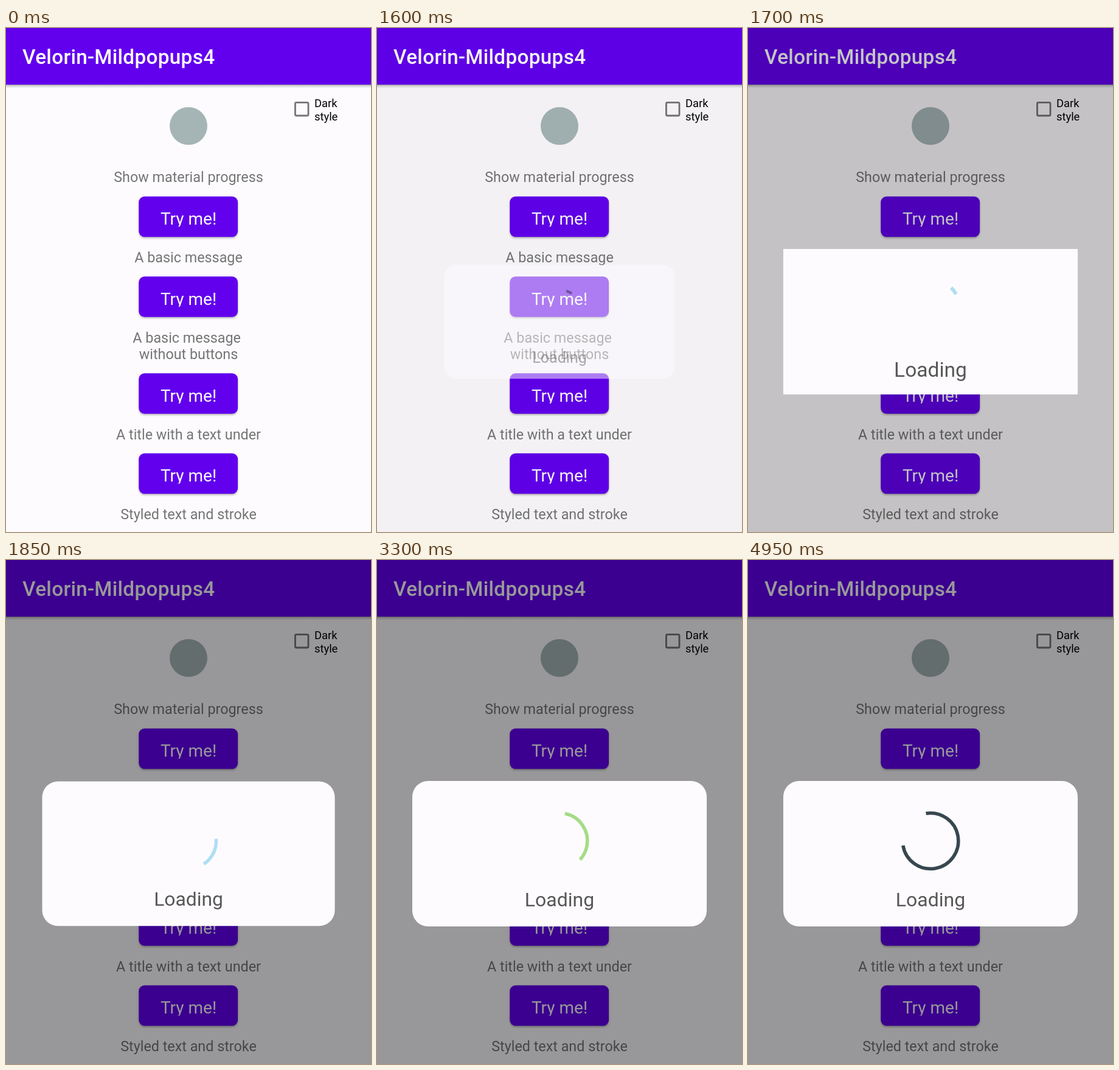
Write an HTML page with a canvas that moves like this. It is 600x828 px and loops after 5 s.

```html
<!DOCTYPE html>
<html lang="en">
<head>
<meta charset="utf-8">
<title>Dialog demo</title>
<style>
html, body { margin: 0; width: 100%; height: 100%; overflow: hidden; background: #fdfbfe; }
canvas { display: block; width: 600px; height: 828px; }
</style>
</head>
<body>
<canvas id="stage" width="600" height="828"></canvas>
<script>
const ctx = document.getElementById('stage').getContext('2d');
const W = 600, H = 828, LOOP = 5000, STEP = 50;
const SURFACE = '#fdfbfe', PURPLE = '#6200ee';
const DIALOG = { x: 58, y: 363, w: 484, h: 239, radius: 26, start: 1556 };
const SPINNER = { x: 300, y: 461.5, radius: 45.8, start: 1533 };

const clamp = u => Math.min(1, Math.max(0, u));
const ease = u => (1 - Math.cos(Math.PI * clamp(u))) / 2;
const mix = (a, b, u) => a + (b - a) * u;

function text(str, x, y, size, color, align = 'center', weight = 400) {
  ctx.font = `${weight} ${size}px Roboto, sans-serif`;
  ctx.textAlign = align;
  ctx.fillStyle = color;
  ctx.fillText(str, x, y);
}

function roundRect(x, y, w, h, r) {
  ctx.beginPath();
  ctx.roundRect(x, y, w, h, r);
}

function drawButton(y) {
  ctx.save();
  ctx.shadowColor = 'rgba(0,0,0,.28)';
  ctx.shadowBlur = 3;
  ctx.shadowOffsetY = 2;
  ctx.fillStyle = PURPLE;
  roundRect(218.3, y, 162.8, 66.5, 9.5);
  ctx.fill();
  ctx.restore();

  // The label's box cuts off the descender.
  ctx.save();
  ctx.beginPath();
  ctx.rect(218, y, 163, 49.6);
  ctx.clip();
  text('Try me!', 300, y + 46.4, 28, '#fff');
  ctx.restore();
}

function drawHeader() {
  const shadow = ctx.createLinearGradient(0, 93, 0, 99);
  shadow.addColorStop(0, 'rgba(0,0,0,.36)');
  shadow.addColorStop(0.4, 'rgba(0,0,0,.14)');
  shadow.addColorStop(1, 'rgba(0,0,0,0)');
  ctx.fillStyle = shadow;
  ctx.fillRect(0, 93, W, 6);
  ctx.fillStyle = PURPLE;
  ctx.fillRect(0, 0, W, 93);
  ctx.letterSpacing = '0.3px';
  text('Velorin-Mildpopups4', 27, 59.3, 33.3, '#fff', 'left', 500);
  ctx.letterSpacing = '0px';
}

function drawPage() {
  ctx.fillStyle = SURFACE;
  ctx.fillRect(0, 0, W, H);
  drawHeader();

  ctx.fillStyle = '#a5b5b6';
  ctx.beginPath();
  ctx.arc(300, 161, 31, 0, Math.PI * 2);
  ctx.fill();

  ctx.strokeStyle = '#757575';
  ctx.lineWidth = 2.8;
  roundRect(475.4, 122.4, 21.6, 21.6, 2);
  ctx.stroke();
  text('Dark', 507, 130, 18.33, '#000', 'left');
  text('style', 507, 151.7, 18.33, '#000', 'left');

  // The wrapped line keeps its trailing space when centred.
  const labels = [
    ['Show material progress', 253], ['A basic message', 385],
    ['A basic message ', 516.6], ['without buttons', 543.8],
    ['A title with a text under', 675.6], ['Styled text and stroke', 807]
  ];
  for (const [str, y] of labels) text(str, 300, y, 23.33, '#757575');
  [276.7, 408.2, 567.2, 698.8].forEach(drawButton);
}

// Pop-in: overshoot, undershoot, settle.
function dialogScale(t) {
  if (t < 135) return mix(0.7, 1.05, ease(t / 135));
  if (t < 240) return mix(1.05, 0.95, ease((t - 135) / 105));
  return mix(0.95, 1, ease((t - 240) / 70));
}

function spinnerColor(time) {
  const colors = ['#aedef4', '#009688', '#a5dc86', '#80cbc4', '#37474f'];
  return colors[Math.floor((time - 1650) / 800)] || 'rgba(0,0,0,.67)';
}

// The arc turns steadily while its head, then its tail, runs ahead.
function spinnerArc(t) {
  const PAUSE = 214, GROW = 460, HALF = PAUSE + GROW, MIN = 16, EXTRA = 254;
  const phase = t < HALF ? t + 24 : t;
  const half = Math.floor(phase / HALF);
  const moved = EXTRA * ease((phase % HALF - PAUSE) / GROW);
  const shrinking = half % 2 === 1;
  const tail = 0.27 * t + EXTRA * Math.floor(half / 2) + (shrinking ? moved : 0);
  const length = MIN + (shrinking ? EXTRA - moved : moved);
  return { from: tail - 90, length };
}

function drawSpinner(time) {
  const { from, length } = spinnerArc(time - SPINNER.start);
  const rad = Math.PI / 180;
  ctx.strokeStyle = spinnerColor(time);
  ctx.lineWidth = 5.5;
  ctx.beginPath();
  ctx.arc(SPINNER.x, SPINNER.y, SPINNER.radius, from * rad, (from + length) * rad);
  ctx.stroke();
}

function drawDialog(time) {
  const { x, y, w, h, radius, start } = DIALOG;
  const t = time - start;
  if (t < 0) return;

  ctx.fillStyle = `rgba(0,0,0,${0.4 * clamp((time - 1578) / 216)})`;
  ctx.fillRect(0, 0, W, H);

  const scale = dialogScale(t), cx = x + w / 2, cy = y + h / 2;
  ctx.save();
  ctx.beginPath();
  ctx.rect(x, y, w, h);
  ctx.clip();
  ctx.globalAlpha = mix(0.2, 1, ease(t / 106));
  ctx.translate(cx, cy);
  ctx.scale(scale, scale);
  ctx.translate(-cx, -cy);
  ctx.fillStyle = SURFACE;
  roundRect(x, y, w, h, radius);
  ctx.fill();
  drawSpinner(time);
  text('Loading', 300, 569, 32, '#575757');
  ctx.restore();
}

function frame() {
  const time = Math.floor((performance.now() + 4) / STEP) * STEP % LOOP;
  drawPage();
  drawDialog(time);
  requestAnimationFrame(frame);
}
frame();
</script>
</body>
</html>
```
